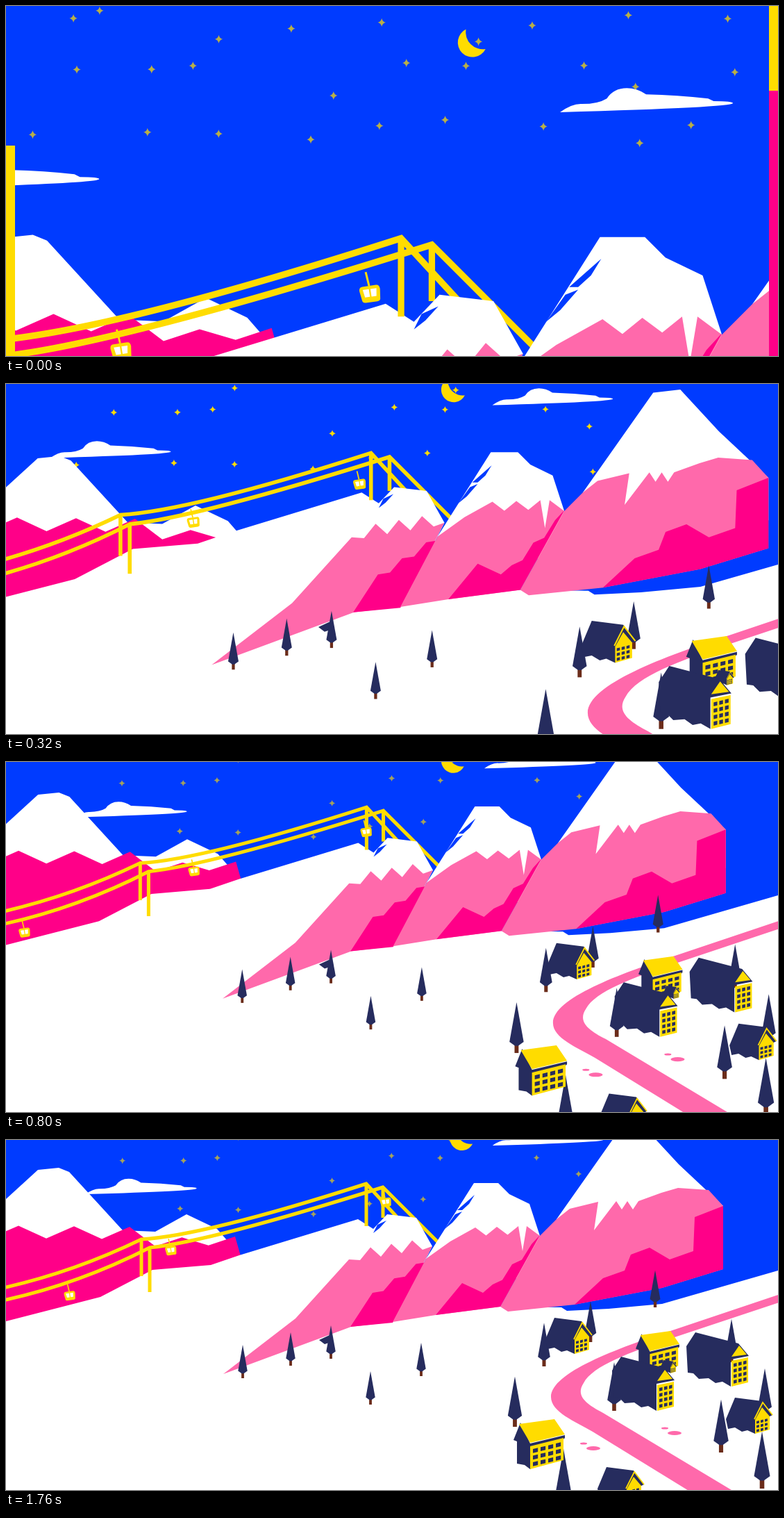
These frames come from a looping animation (1112x504 px, 1.84 s). An HTML page with a canvas:

```html
<!DOCTYPE html>
<html lang="en">
<head>
<meta charset="utf-8">
<title>Ski village</title>
<style>
html, body { margin: 0; width: 100%; height: 100%; overflow: hidden; background: #003bff; }
canvas { display: block; }
</style>
</head>
<body>
<canvas width="1112" height="504"></canvas>
<script>
const ctx = document.querySelector('canvas').getContext('2d');
const LOOP = 1840, STEP = 80;
const BLUE = '#003bff', WHITE = '#fff', HOT = '#ff0088', PINK = '#ff69ab';
const YELLOW = '#ffdc00', NAVY = '#262c5e', BROWN = '#6b2c1a';

const fill = (color, path) => {
  ctx.fillStyle = color;
  ctx.fill(new Path2D(path));
};
const stroke = (color, width, path) => {
  ctx.strokeStyle = color;
  ctx.lineWidth = width;
  ctx.stroke(new Path2D(path));
};
const at = (x, y, sx, sy, draw) => {
  ctx.save();
  ctx.translate(x, y);
  ctx.scale(sx, sy);
  draw();
  ctx.restore();
};
const random = seed => {
  const v = Math.sin(seed * 12.9898) * 43758.5453;
  return v - Math.floor(v);
};

// Zigzag edge as path segments: n teeth sides around the line between two points.
const jag = (x0, y0, x1, y1, n, amp) => {
  let path = '';
  for (let i = 0; i <= n; i++)
    path += `L${x0 + (x1 - x0) * i / n} ${y0 + (y1 - y0) * i / n + (i % 2 ? amp : -amp)}`;
  return path;
};

// Camera pull-back: every layer shrinks towards a vanishing point by its nearness.
const dolly = t => 0.459 * Math.exp(-t / 213) * Math.max(0, Math.min(1, (1040 - t) / 400));
const zoom = (d, nearness) => 1 / (1 - nearness * d);
const layer = (d, nearness, cy, draw, nearnessY = nearness) => {
  const sx = zoom(d, nearness), sy = zoom(d, nearnessY);
  at(-460 * (sx - 1), cy * (sy - 1), sx, sy, draw);
};

function stars(t) {
  ctx.globalAlpha = 0.82 + 0.18 * Math.sin((t - 90) / 960 * 2 * Math.PI);
  for (let i = 0; i < 27; i++) {
    const x = 90 + i % 9 * 100 + random(i + 1) * 80;
    const y = -40 + Math.floor(i / 9) * 62 + random(i + 50) * 45;
    at(x, y, 1, 1, () => fill(YELLOW, 'M0-4.6Q.9-.9 4.6 0 .9.9 0 4.6-.9.9-4.6 0-.9-.9 0-4.6Z'));
  }
  ctx.globalAlpha = 1;
}

const moon = t => at(632 + t * 0.0135, -2, 0.84, 0.84, () =>
  fill(YELLOW, 'M-8-18.5A20.5 20.5 0 1 0 19.5 9A24 24 0 0 1-8-18.5Z'));

const cloud = (x, y) => at(x, y, 0.637, 0.637, () => fill(WHITE,
  'M0 0Q18-13 32-12 55-12 68-20 78-35 97-35 112-35 125-26 170-25 215-20L223-16Q251-16 251-13 250-7 0 0Z'));

function backRange() {
  fill(WHITE, 'M-60 140L46 43 76 40 91 46 168 130 215 132 260 107 304 128 338 167V300H-60Z');
  fill(HOT, 'M-60 300' + jag(-22, 132, 178, 134, 5, -9) + jag(215, 147, 330, 145, 3, -6) + 'L338 167V300Z');
}

function lift(t) {
  stroke(YELLOW, 5, 'M519 64V124M543 69V112M195 144V196M207 154V219' +
    'M-20 217L0 212Q100 189 195 143Q285 138 519 63L566 114' +
    'M-20 234L0 230Q105 207 207 155Q295 146 543 68L622 147');
  const right = 495 + t * 0.0295, left = 301 - t * 0.036, low = -22.4 + t * 0.065;
  gondola(right, 97 - (right - 523) * 0.32);
  gondola(left, 155 - (left - 268) * 0.13);
  gondola(low, 239 - (low - 40) * 0.29);
}

const gondola = (x, y) => at(x, y, 0.9, 0.85, () => {
  ctx.rotate(-0.15);
  stroke(YELLOW, 1.8, 'M-1-20L0-7');
  fill(YELLOW, 'M-6-7H6Q9-7 9-3L8 5Q8 8 5 8H-5Q-8 8-8 5L-9-3Q-9-7-6-7Z');
  fill(WHITE, 'M-6-4H-.7V3H-5ZM.7-4H6L5 3H.7Z');
});

const slope = () => fill(WHITE, 'M-400 366L0 261 136 226 211 187 295 180 336 166 507 114 529 128 ' +
  '605 200 712 240 800 241 808 246 868 243 945 236 1112 188 1400 100V1000H-400Z');

function peaks() {
  fill(WHITE, 'M497 200L529 128 549 107 591 112 614 153 580 220Z');
  fill(BLUE, 'M548 116L535 122 529 134 538 127Z');
  fill(PINK, 'M313 337L417 257 494 172' + jag(510, 165, 600, 150, 6, -8) + 'L614 153 557 262 497 269Z');
  fill(HOT, 'M496 269' + jag(528, 224, 606, 172, 5, 4) + 'L557 263Z');

  fill(WHITE, 'M605 171L674 62H709L725 78 754 92 769 138 740 200Z');
  fill(BLUE, 'M675 79L650 101 657 101 667 92ZM657 103L647 107 632 128 643 119Z');
  fill(PINK, 'M557 262L605 171 640 146' + jag(676, 132, 738, 130, 4, 6) + 'L744 160 750 124 769 138 712 240 619 252Z');
  fill(HOT, 'M619 252L657 206 687 220' + jag(701, 212, 757, 154, 4, 4) + 'L769 137 712 240Z');

  fill(WHITE, 'M793 114L884-15 919-19 969 35 1033 95V150H793Z');
  fill(PINK, 'M712 240L769 138 793 114 812 99 853 89 847 130' + jag(879, 94, 911, 94, 4, 6) +
    'L944 76 968 69 1012 72 1033 95V186L945 213 819 237 723 247Z');
  fill(HOT, 'M1033 95L992 111 990 160 956 172 927 155 900 165 891 188 860 199 819 237 945 213 1033 186Z');
}

const tree = (x, base, height) => at(x, base, height / 100, height / 100, () => {
  fill(BROWN, 'M-4-22H4V0H-4Z');
  fill(NAVY, 'M0-100L14-22 3-14H-3L-14-22Z');
});

function slopeTrees() {
  fill(NAVY, 'M451 288L466 281 465 292 459 294Z');
  for (const [x, base] of [[341, 343], [410, 325], [468, 315], [525, 381], [598, 340]])
    tree(x, base, 48);
}

// Windows on a wall that leans upwards to the right.
function windows(x, y, cols, rows, dx, dy) {
  const w = dx * 0.65, h = dy * 0.6, lean = 0.24;
  for (let c = 0; c < cols; c++)
    for (let r = 0; r < rows; r++)
      fill(NAVY, `M${x + c * dx} ${y + r * dy - c * dx * lean}l${w} ${-w * lean}v${h}l${-w} ${w * lean}Z`);
}

const cottage = (x, y, scale = 1) => at(x, y, scale, scale, () => {
  fill(NAVY, 'M-13 31L0 0 39 5 54 25 50 27 29 52 18 47 10 49 0 43-10 45Z');
  stroke(YELLOW, 1.8, 'M28 31L40 7 54 25');
  fill(YELLOW, 'M29 32L39 14 50 27V46L29 52Z');
  windows(31, 34, 3, 3, 6, 6);
});

const lodge = (x, y) => at(x, y, 1, 1, () => {
  fill(NAVY, 'M0 20L13 0 75 16 90 34 64 39V78L52 71 42 73 32 66 18 67 10 59 2 58Z');
  fill(YELLOW, 'M65 35L76 19 87 32ZM65 41L89 36V72L65 78Z');
  windows(68, 45, 3, 4, 7, 8);
});

const hotel = (x, y, scale = 1) => at(x, y, scale, scale, () => {
  fill(NAVY, 'M0 30L10 5 24 35 74 23V27L24 72 16 66 5 64V32Z');
  fill(YELLOW, 'M8 7L59 0 74 22 24 34ZM24 39L72 27V59L24 72Z');
  windows(28, 43, 4, 3, 11, 9.5);
});

const puddle = (x, y) => fill(PINK,
  `M${x - 10} ${y}a10 3 0 1 1 20 0a10 3 0 1 1-20 0M${x - 19} ${y - 7}a5 1.5 0 1 1 10 0a5 1.5 0 1 1-10 0`);

function village() {
  fill(PINK, 'M1300 160L960 274C880 300 785 335 785 370C785 392 820 405 845 420L980 503 1100 577H1170' +
    'L1045 504 860 393C835 380 820 368 832 350C845 325 900 305 960 285L1300 172Z');
  puddle(846, 444);
  puddle(963, 422);
  const trees = [[935, 241], [842, 291], [1045, 320], [775, 326], [876, 390], [1093, 400], [733, 413], [1030, 450], [1089, 502], [803, 530]];
  for (const [x, base] of trees) tree(x, base, 27 + base * 0.11);
  cottage(790, 256);
  hotel(907, 275, 0.85);
  cottage(947, 317, 0.36);
  lodge(980, 277);
  lodge(873, 312);
  cottage(1050, 371);
  hotel(731, 402);
  cottage(865, 471);
}

// Coloured side edges that show only as the loop opens.
function edges(t) {
  if (t >= 240) return;
  const opening = t < 160;
  fill(YELLOW, `M0 201H13V${opening ? 504 : 320}H0Z`);
  if (opening) fill(BLUE, 'M0 0H13V201H0Z');
  fill(YELLOW, 'M1099 0H1112V168H1099Z');
  const fade = ctx.createLinearGradient(0, 168, 0, 215);
  fade.addColorStop(0, HOT);
  fade.addColorStop(1, PINK);
  fill(opening ? HOT : fade, opening ? 'M1099 122H1112V504H1099Z' : 'M1099 168H1112V215H1099Z');
}

function render(t) {
  const d = dolly(t), drift = t * 0.0135;
  ctx.fillStyle = BLUE;
  ctx.fillRect(0, 0, 1112, 504);
  layer(d, 0.4, 169, () => stars(t), 0.515);
  layer(d, 0.4, 245, () => moon(t));
  layer(d, 0.78, 252, () => {
    cloud(91 + drift, 78);
    cloud(677 + drift, 8);
  });
  const far = zoom(d, 0.57);
  at(-305 * d * d, 600 * d, far, far, backRange);
  layer(d, 1, 257, () => {
    slope();
    lift(t);
    peaks();
    slopeTrees();
  });
  layer(d, 1.37, 266, village);
  edges(t);
}

function frame(now) {
  render(Math.floor(now % LOOP / STEP) * STEP);
  requestAnimationFrame(frame);
}
requestAnimationFrame(frame);
</script>
</body>
</html>
```
